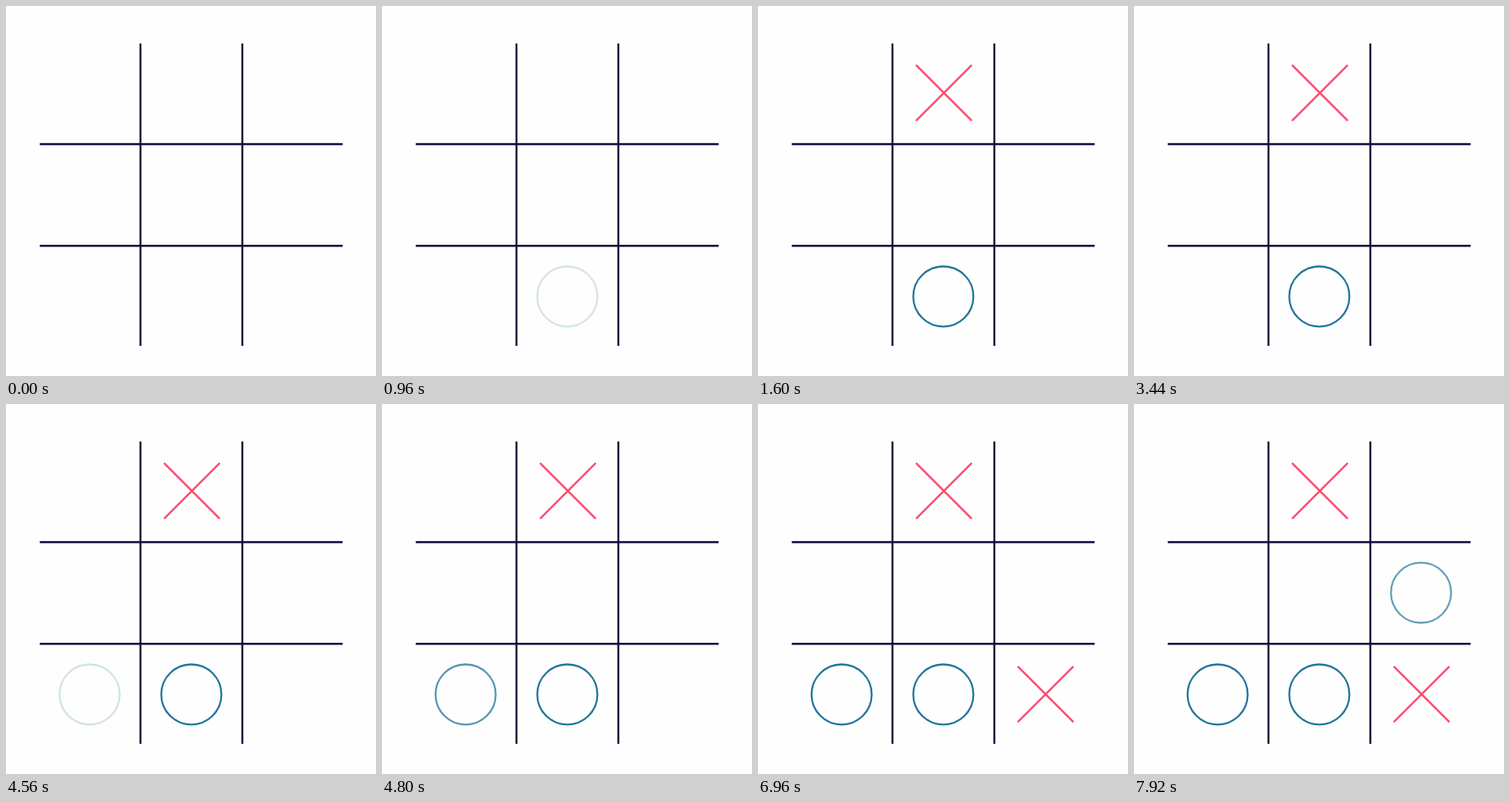
Recreate the animation shown at these times as an HTML page. Size 454x454 px, loop 8000 ms.

```html
<!DOCTYPE html>
<html lang="en">
<head>
<meta charset="utf-8">
<title>Noughts and crosses</title>
<style>
html, body { margin: 0; width: 100%; height: 100%; overflow: hidden; background: #fefefe; }
svg { display: block; width: 100vw; height: 100vh; fill: none; }
</style>
</head>
<body>
<svg viewBox="0 0 454 454">
  <path d="M165 46V417M290 46V417M41.5 169.5H413M41.5 294.2H413" stroke="#0b0b3c" stroke-width="2.4"/>
  <g id="marks" stroke-linecap="round"></g>
</svg>
<script>
const LOOP = 8000, STEP = 80;
const NS = "http://www.w3.org/2000/svg";
const layer = document.getElementById("marks");

// col and row run from 0 to 2; start and length are in ms
const moves = [
  { type: "o", col: 1, row: 2, start: 900, length: 600 },
  { type: "x", col: 1, row: 0, start: 1230, length: 400 },
  { type: "o", col: 0, row: 2, start: 4495, length: 600 },
  { type: "x", col: 2, row: 2, start: 4840, length: 400 },
  { type: "o", col: 2, row: 1, start: 7655, length: 600 }
];

function add(tag, attrs) {
  const el = document.createElementNS(NS, tag);
  for (const key in attrs) el.setAttribute(key, attrs[key]);
  return layer.appendChild(el);
}

for (const m of moves) {
  const x = 102.6 + 124.8 * m.col, y = 106.8 + 124.8 * m.row;
  m.el = m.type === "o"
    ? add("circle", { cx: x, cy: y, r: 36.9, stroke: "#23769c", "stroke-width": 2.3 })
    : add("path", {
        d: `M${x - 32.8} ${y - 33.7}l67 67m0 -67l-67 67`,
        stroke: "#fb4a6c", "stroke-width": 2.4
      });
}

const easeOut = u => 1 - (1 - u) ** 2;

function draw(t) {
  for (const m of moves) {
    const u = Math.min(1, Math.max(0, (t - m.start) / m.length));
    m.el.setAttribute("opacity", easeOut(u));
  }
}

let origin = null;
function tick(now) {
  if (origin === null) origin = now;
  const t = (now - origin) % LOOP;
  draw(Math.floor(t / STEP) * STEP);
  requestAnimationFrame(tick);
}
draw(0);
requestAnimationFrame(tick);
</script>
</body>
</html>
```
